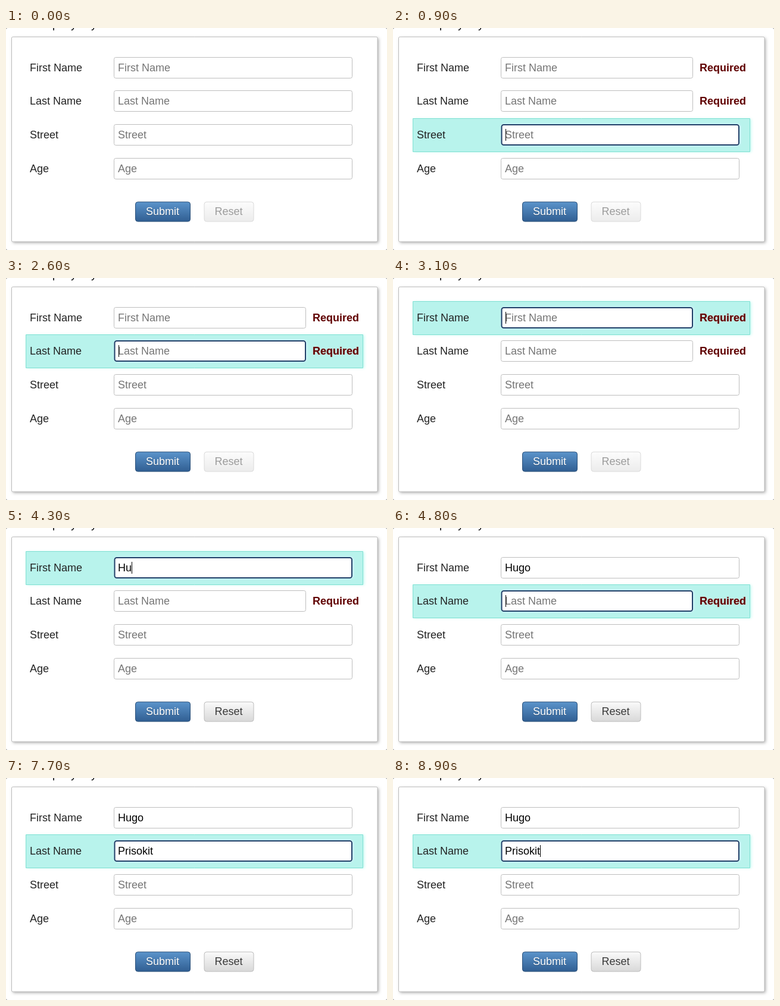
An HTML page with a canvas for the animation above (9000 ms loop, 640 by 374 pixels).

```html
<!DOCTYPE html>
<html lang="en">
<head>
<meta charset="utf-8">
<title>Form validation</title>
<style>
  html, body { margin: 0; width: 100%; height: 100%; overflow: hidden; background: #fff; }
  canvas { display: block; width: 640px; height: 374px; }
</style>
</head>
<body>
<canvas id="stage" width="640" height="374"></canvas>
<script>
const ctx = document.getElementById('stage').getContext('2d');
const LOOP = 9000;
const FONT = '18px "Liberation Sans", Arial, sans-serif';
const LABELS = ['First Name', 'Last Name', 'Street', 'Age'];

// Typed values with the time of each keystroke
const TYPED = [
  { text: 'Hugo', keys: [4000, 4200, 4500, 4600] },
  { text: 'Prisokit', keys: [5600, 5700, 5900, 6000, 6100, 6500, 6700, 6800] }
];
const FOCUS = [[900, 2], [2600, 1], [3000, 0], [4800, 1]];
const SUBMITTED = 900;

const clamp = v => Math.max(0, Math.min(1, v));
const mix = (a, b, k) => `rgb(${a.map((v, i) => Math.round(v + (b[i] - v) * k))})`;
const grey = (a, b, k) => mix([a, a, a], [b, b, b], k);
const rowTop = i => Math.round(48.7 + 56.67 * i);

function box(x, y, w, h, r, fill, stroke, line = 1) {
  ctx.beginPath();
  ctx.roundRect(x, y, w, h, r);
  if (fill) { ctx.fillStyle = fill; ctx.fill(); }
  if (stroke) { ctx.strokeStyle = stroke; ctx.lineWidth = line; ctx.stroke(); }
}

function glow(color, blur, dx, dy, draw) {
  ctx.save();
  ctx.shadowColor = color;
  ctx.shadowBlur = blur;
  ctx.shadowOffsetX = dx;
  ctx.shadowOffsetY = dy;
  draw();
  ctx.restore();
}

function label(str, x, y, color, weight = '') {
  ctx.font = weight + FONT;
  ctx.fillStyle = color;
  ctx.fillText(str, x, y);
}

function vertical(y, h, top, bottom) {
  const g = ctx.createLinearGradient(0, y, 0, y + h);
  g.addColorStop(0, top);
  g.addColorStop(1, bottom);
  return g;
}

function valueAt(i, t) {
  const entry = TYPED[i];
  return entry ? entry.text.slice(0, entry.keys.filter(k => k <= t).length) : '';
}

function focusAt(t) {
  const active = FOCUS.filter(f => f[0] <= t).pop();
  if (!active) return { row: -1, caret: false };
  const [since, row] = active;
  const keys = TYPED[row] ? TYPED[row].keys : [];
  const last = Math.max(since, ...keys.filter(k => k <= t));
  return { row, caret: (t - last) % 1000 < 500 };
}

function drawRow(i, t, focus) {
  const top = rowTop(i);
  const base = top + 24;
  const value = valueAt(i, t);
  const missing = i < 2 && t >= SUBMITTED && !value;
  const right = missing ? 503.5 : 581.5;
  const focused = focus.row === i;

  if (focused) {
    glow('rgba(150,245,232,.55)', 4, 2, 0, () => box(33.5, top - 9.5, 566, 56, 0, '#b8f3ec'));
    box(33.5, top - 9.5, 566, 56, 0, null, '#7fe0d2');
    glow('#d6f3ff', 5, 1, 0, () => box(182, top, right - 181.5, 35.5, 4, '#fff'));
    box(182.5, top + 1, right - 183, 34, 3.5, '#fff', '#203f68', 2);
  } else {
    box(181.5, top + 0.5, right - 181.5, 35, 3, '#fff', '#bdbdbd');
  }

  label(LABELS[i], 40, base, '#222');
  label(value || LABELS[i], 188, base, value ? '#000' : '#757575');
  if (focused && focus.caret) {
    const x = 188 + (value ? ctx.measureText(value).width : 0.5);
    ctx.fillStyle = '#000';
    ctx.fillRect(Math.round(x), top + 8, 1, 20);
  }
  if (missing) {
    const draw = () => label('Required', 515, base, '#600000', 'bold ');
    if (focused) glow('rgba(255,80,80,.45)', 2, 0, 0, draw);
    else draw();
  }
}

function drawButtons(t) {
  const held = t < SUBMITTED ? 0.3 * clamp(t / 300) + (t >= 600 ? 0.3 : 0) : 0;
  box(217.5, 293, 92, 33, 4,
    vertical(293, 33, mix([91, 148, 203], [52, 100, 152], held), mix([48, 94, 146], [38, 78, 124], held)),
    '#2b5079');
  glow('rgba(0,0,0,.3)', 1, 0, 1, () => label('Submit', 235, 315, '#fff'));

  const on = clamp((t - 3900) / 400);
  box(333, 293, 83, 33, 4,
    vertical(293, 33, grey(252, 250, on), grey(236, 216, on)),
    grey(218, 188, on));
  label('Reset', 350.5, 315, grey(156, 58, on));
}

function draw(t) {
  ctx.fillStyle = '#8a8a8a';
  ctx.fillRect(0, 0, 640, 374);
  box(0, 0, 640, 374, 3, '#fff');
  label('The full party any time', 14, 0, '#000');

  glow('rgba(0,0,0,.32)', 5, 2, 2, () => box(9.5, 15, 614.5, 345, 2, '#fff'));
  box(9.5, 15, 614.5, 345, 2, '#fff', '#bcbcbc');

  const focus = focusAt(t);
  LABELS.forEach((_, i) => drawRow(i, t, focus));
  drawButtons(t);
}

const start = performance.now();
function tick() {
  const t = (performance.now() - start) % LOOP;
  draw(Math.floor(t / 100) * 100);
  requestAnimationFrame(tick);
}
tick();
</script>
</body>
</html>
```
